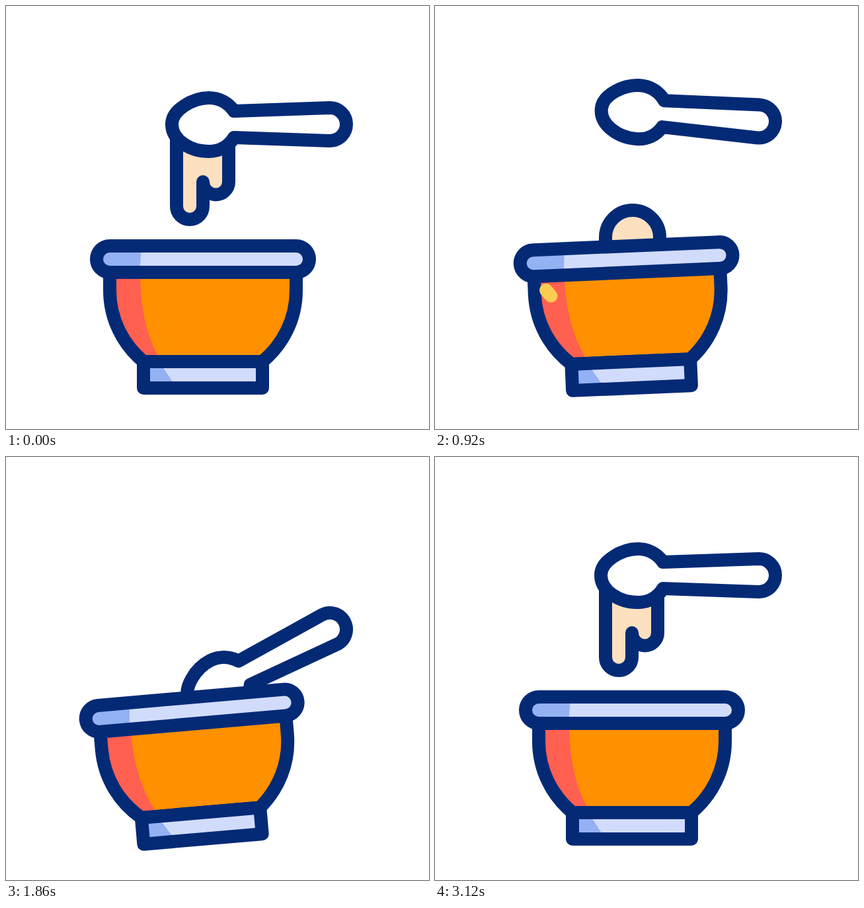
Write an HTML page that moves like this. It is 640 px wide and 640 px high and loops after 3200 ms.

```html
<!DOCTYPE html>
<html lang="en">
<head>
<meta charset="utf-8">
<title>Bowl and spoon</title>
<style>
  html, body { margin: 0; height: 100%; overflow: hidden; background: #fff; }
  svg { display: block; width: 100%; height: 100%; }
  .ink { stroke: #042a76; }
  .glow { stroke: #ffcc52; fill: none; }
</style>
</head>
<body>
<svg viewBox="0 0 640 640" stroke-width="20" stroke-linecap="round" stroke-linejoin="round">
  <path id="column" class="ink" fill="#fde0bf"/>
  <path id="drip" class="ink" fill="#fde0bf"/>
  <path id="spoon" class="ink" fill="#fff" d="M345 159C336 146 322 139 307 139C283 139 251 157 251 179C251 203 279 220 307 220C324 220 337 212 345 199L490 204A25 25 0 0 0 490 154Z"/>
  <g id="bowl">
    <path fill="#ff9000" d="M157 403V430C157 474 177 512 208 538H388C419 512 439 474 439 430V403Z"/>
    <path fill="#ff6050" d="M157 403V430C157 474 177 512 208 538H235C214 505 203 460 203 403Z"/>
    <path class="ink" fill="none" d="M157 403V430C157 474 177 512 208 538H388C419 512 439 474 439 430V403"/>
    <path fill="#d1dcfd" d="M208 538H388V578H208Z"/>
    <path fill="#94b1f4" d="M208 538H232L258 578H208Z"/>
    <path class="ink" fill="none" d="M208 538H388V578H208Z"/>
    <rect fill="#d1dcfd" x="137" y="363" width="322" height="40" rx="20"/>
    <path fill="#94b1f4" d="M157 363H205L202 403H157A20 20 0 0 1 157 363Z"/>
    <rect class="ink" fill="none" x="137" y="363" width="322" height="40" rx="20"/>
  </g>
  <path id="swoosh" class="glow" pathLength="100" d="M498 367C490 455 425 511 335 511C262 511 208 478 168 430"/>
  <g id="ticks">
    <path class="glow" pathLength="100" d="M262 182L247 225"/>
    <path class="glow" pathLength="100" d="M304 189L306 251"/>
    <path class="glow" pathLength="100" d="M343 185L371 240"/>
  </g>
</svg>
<script>
const LOOP = 3200;
const el = id => document.getElementById(id);
const [column, drip, spoon, bowl, swoosh] = ['column', 'drip', 'spoon', 'bowl', 'swoosh'].map(el);
const ticks = [...el('ticks').children];

const progress = (t, from, to) => Math.min(1, Math.max(0, (t - from) / (to - from)));
const smooth = p => p * p * (3 - 2 * p);
const show = (node, on) => node.setAttribute('visibility', on ? 'visible' : 'hidden');

// Linear interpolation through [time, value] pairs
function track(t, keys) {
  let value = keys[0][1];
  for (let i = 1; i < keys.length; i++) {
    const [t0, v0] = keys[i - 1], [t1, v1] = keys[i];
    if (t >= t0) value = v0 + (v1 - v0) * progress(t, t0, t1);
  }
  return value;
}

// Shows the part of a path between two fractions of its length
function trim(path, tail, head) {
  show(path, head > 0 && tail < 1);
  path.setAttribute('stroke-dasharray', `${Math.max(0.01, (head - tail) * 100)} 300`);
  path.setAttribute('stroke-dashoffset', -tail * 100);
}

function spoonPose(t) {
  if (t < 1220) return {
    y: track(t, [[230, 179], [500, 165], [600, 140], [760, 167], [920, 174.5], [1220, 183]]),
    angle: track(t, [[230, 0], [500, 4.5]])
  };
  if (t < 1860) {
    const dip = 1 - (1 - progress(t, 1220, 1860)) ** 2;
    return { y: 183 + 78 * dip, angle: 4.5 - 31.5 * dip };
  }
  const left = 1 - progress(t, 1860, 2450);
  return { y: 179 + 82 * left, angle: -27 * left };
}

function drawDrip(t, top) {
  const growth = track(t, [[1900, 0.3], [2240, 0.73], [3120, 1]]);
  const early = t < 1200;
  const long = early ? track(t, [[230, 124], [400, 260]]) : 124 * growth;
  const short = early ? track(t, [[230, 87], [400, 260]]) : 87 * growth;
  const x = early ? 258 : track(t, [[1900, 262], [2240, 261], [3120, 258]]);
  const r = (298 - x) / 2;
  show(drip, t < 410 || t > 1950);
  drip.setAttribute('d', `M${x} ${top + 14}V${top + long}A${r} ${r} 0 0 0 298 ${top + long}V${top + short}a19.5 19.5 0 0 0 39 0V${top + 14}Z`);
}

function render(t) {
  const { y, angle } = spoonPose(t);
  spoon.setAttribute('transform', `translate(0 ${y - 179}) rotate(${angle} 490 179)`);
  drawDrip(t, y - 183 * Math.sin(angle * Math.PI / 180));

  const cap = track(t, [[400, 200], [490, 252], [1220, 418]]);
  show(column, t > 400 && t < 1220);
  column.setAttribute('d', `M258 440V${cap}a41 41 0 0 1 82 0V440`);

  const tilt = track(t, [[340, 0], [780, -5], [1335, 5], [1855, -5], [2475, 0]]);
  bowl.setAttribute('transform', `rotate(${tilt} 298 578)`);

  const sweep = t - (t < 1500 ? 340 : 1868);
  trim(swoosh, smooth(progress(sweep, 310, 610)), smooth(progress(sweep, 0, 400)));
  for (const tick of ticks) trim(tick, progress(t, 480, 620), progress(t, 440, 520));
}

function frame() {
  render(performance.now() % LOOP);
  requestAnimationFrame(frame);
}
frame();
</script>
</body>
</html>
```
